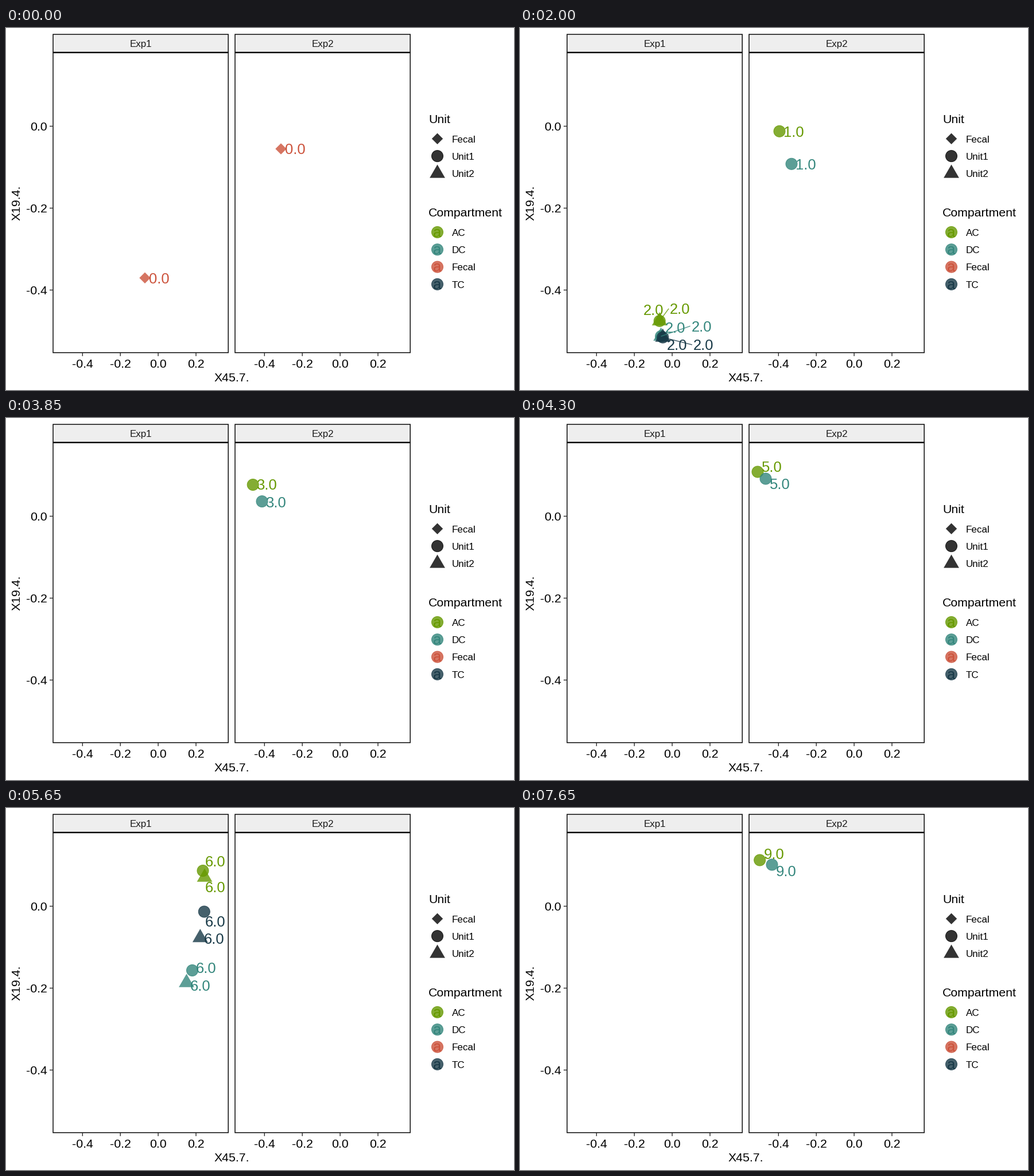
Write a matplotlib script that moves like this. It is 885 px wide and 632 px high and loops after 8 s.

```python
from itertools import combinations

import matplotlib.pyplot as plt
import numpy as np
from matplotlib.animation import FuncAnimation
from matplotlib.patches import Circle, Polygon, Rectangle

W, H, DPI = 885, 632, 100
STEP, LOOP = 50, 8000
PT = 72 / DPI
ALPHA = 0.8
LABEL_SIZE = 25.6

COLORS = {"AC": "#669900", "DC": "#33867c", "Fecal": "#cc523b", "TC": "#183947"}
PANELS = {"Exp1": 82, "Exp2": 399}
PANEL_W, STRIP_TOP, STRIP_BOTTOM, PANEL_TOP, PANEL_BOTTOM = 305.2, 11.1, 42.3, 43.3, 566.8

# Every state rests for HOLD ms, then moves linearly to the next one.
HOLD, PERIOD, FIRST = 550, 1100, -50
DAYS = [0, 1, 2, 3, 5, 6, 7, 9]
SAMPLED = {"Exp1": (0, 1, 2, 5, 6, 7), "Exp2": (0, 1, 3, 5, 7, 9)}

# Key points of Unit1 by day.
FECAL = {"Exp1": (242, 436.3), "Exp2": (479, 211)}
PATHS = {
    "Exp1": {
        "AC": {1: (233, 494), 2: (247, 518), 5: (340, 80), 6: (343, 109.5), 7: (345, 125.5)},
        "DC": {1: (242, 528), 2: (247, 542), 5: (302, 379), 6: (324.5, 283.5), 7: (337, 230.5)},
        "TC": {1: (243, 543), 2: (251, 539), 5: (340, 203), 6: (345.3, 181), 7: (348.5, 169)},
    },
    "Exp2": {
        "AC": {1: (452, 180.3), 3: (432, 119), 5: (412.2, 91.5), 9: (417.7, 91)},
        "DC": {1: (473, 237.3), 3: (448, 150), 5: (426, 101.6), 9: (439, 99)},
    },
}
# Unit2 coincides with Unit1 at first, later it trails: lag on day 6, drift per day.
LAG = {"AC": ((3, 11.5), (-7, 17)), "DC": ((-10, 21.5), (2.6, 0.5)), "TC": ((-7, 45.5), (2.5, -9))}

fig = plt.figure(figsize=(W / DPI, H / DPI), dpi=DPI, facecolor="white")
ax = fig.add_axes([0, 0, 1, 1])
ax.set_xlim(0, W)
ax.set_ylim(H, 0)
ax.axis("off")


def text(x, y, s, size, color="black", ha="left"):
    """Text whose capitals or digits are centred on y."""
    return ax.text(x, y + 0.36 * size, s, fontsize=size * PT, color=color, ha=ha,
                   va="baseline", family="Liberation Sans", zorder=5)


def line(x0, y0, x1, y1, color="black", width=1.5, **style):
    return ax.plot([x0, x1], [y0, y1], color=color, lw=width * PT, snap=False,
                   solid_capstyle="butt", **style)[0]


def mark(shape, x, y, color):
    if shape == "circle":
        patch = Circle((x, y), 10, fc=color, ec=color, lw=1 * PT, alpha=ALPHA)
    else:
        if shape == "triangle":
            points = [(x, y - 15.5), (x + 13.4, y + 7.75), (x - 13.4, y + 7.75)]
        else:
            points = [(x, y - 9.7), (x + 9.7, y), (x, y + 9.7), (x - 9.7, y)]
        patch = Polygon(points, fc=color, lw=0, alpha=ALPHA)
    patch.set_zorder(4)
    return ax.add_patch(patch)


def box(x, top, bottom, fill):
    ax.add_patch(Rectangle((x, top), PANEL_W, bottom - top, fc=fill, ec="black",
                           lw=1.45 * PT, zorder=2, joinstyle="miter", snap=False))


def draw_panels():
    for name, left in PANELS.items():
        box(left, PANEL_TOP, PANEL_BOTTOM, "white")
        box(left, STRIP_TOP, STRIP_BOTTOM, "#eeeeee")
        text(left + PANEL_W / 2, 27, name, 17, "#1a1a1a", "center")
        for i, value in enumerate((-0.4, -0.2, 0.0, 0.2)):
            x = left + 51.3 + 65.9 * i
            line(x, PANEL_BOTTOM, x, PANEL_BOTTOM + 6, "#333333")
            text(x, 585, f"{value:.1f}", 21.3, ha="center")
    for i, value in enumerate((0.0, -0.2, -0.4)):
        y = 171.5 + 143 * i
        line(76, y, 82, y, "#333333")
        text(72, y, f"{value:.1f}", 21.3, ha="right")
    text(393, 609, "X45.7.", 21.3, ha="center")
    ax.text(18.8, 305, "X19.4.", fontsize=21.3 * PT, family="Liberation Sans",
            rotation=90, ha="center", va="center")


def draw_legend():
    x = 751.5
    text(736, 158, "Unit", 21.3)
    units = [("Fecal", "diamond"), ("Unit1", "circle"), ("Unit2", "triangle")]
    for i, (name, shape) in enumerate(units):
        y = 193.3 + 30.3 * i
        mark(shape, x, y, "black")
        text(777, y + 0.4, name, 17)
    text(736, 321, "Compartment", 21.3)
    for i, (name, color) in enumerate(COLORS.items()):
        y = 356.5 + 30.3 * i
        mark("circle", x, y, color)
        text(x, y - 1, "a", LABEL_SIZE, color, "center")
        text(777, y + 0.2, name, 17)


def layout(panel, day):
    """Marks of one panel on a sampled day as {(group, shape): (x, y)}."""
    if day == 0:
        return {("Fecal", "diamond"): FECAL[panel]}
    marks = {}
    for group, path in PATHS[panel].items():
        x, y = (np.interp(day, list(path), axis) for axis in zip(*path.values()))
        if panel == "Exp1":
            (dx, dy), (drift_x, drift_y) = LAG[group]
            late = day >= 5
            marks[group, "triangle"] = (x + late * (dx + drift_x * (day - 6)),
                                        y + late * (dy + drift_y * (day - 6)))
        marks[group, "circle"] = (x, y)
    return marks


def place_labels(marks, panel):
    """Start right of each mark, then push labels off each other and off the marks."""
    right, floor = PANELS[panel] + PANEL_W - 23, PANEL_BOTTOM - 13.8
    labels = []
    for (group, shape), (x, y) in marks.items():
        lx, ly = x + 24.5, y
        if y > 470:  # near the floor labels form two columns, with AC on top
            lx += 46 * (shape == "triangle") - 35 * (group == "AC")
            ly -= 18 * (group == "AC")
        labels.append([min(lx, right), ly])
    for _ in range(60):
        for a, b in combinations(labels, 2):
            gap = b[1] - a[1]
            if abs(b[0] - a[0]) < 45 and abs(gap) < 30.5:
                push = np.copysign((30.5 - abs(gap)) / 2, gap)
                a[1] -= push
                b[1] += push
        for label in labels:
            for x, y in marks.values():
                gap = label[1] - y
                if abs(label[0] - x) < 22 and abs(gap) < 16.5:
                    label[1] += np.copysign((16.5 - abs(gap)) / 2, gap)
            label[1] = min(label[1], floor)
    return labels


def draw_label(x, y, lx, ly, day, color):
    """Day label, tied to its mark by a line when it sits far away."""
    artists = [text(lx, ly, f"{day}.0", LABEL_SIZE, color, "center")]
    end = np.clip(x, lx - 19.5, lx + 19.5)
    if np.hypot(end - x, ly - y) > 23:
        artists.append(line(x, y, end, ly, color, 1.5, alpha=ALPHA, zorder=4.8))
    return artists


moving = []


def update(frame):
    while moving:
        moving.pop().remove()
    state, elapsed = divmod(frame * STEP - FIRST, PERIOD)
    day = DAYS[state]
    following = DAYS[min(state + 1, len(DAYS) - 1)]
    u = max(0, elapsed - HOLD) / (PERIOD - HOLD)
    for panel, days in SAMPLED.items():
        if day not in days:
            continue
        # Marks with no match in the next state stay put until it arrives.
        goal = following if day and following in days else day
        shown = goal if u >= 0.5 else day
        start, end = layout(panel, day), layout(panel, goal)
        marks = {key: tuple(p + (q - p) * u for p, q in zip(start[key], end[key]))
                 for key in start}
        for (group, shape), (x, y) in marks.items():
            moving.append(mark(shape, x, y, COLORS[group]))
        for (key, (x, y)), (lx, ly) in zip(marks.items(), place_labels(marks, panel)):
            moving.extend(draw_label(x, y, lx, ly, shown, COLORS[key[0]]))
    return moving


draw_panels()
draw_legend()
anim = FuncAnimation(fig, update, frames=LOOP // STEP, init_func=lambda: moving,
                     interval=STEP, repeat=True, repeat_delay=0, blit=False)
plt.show()
```
